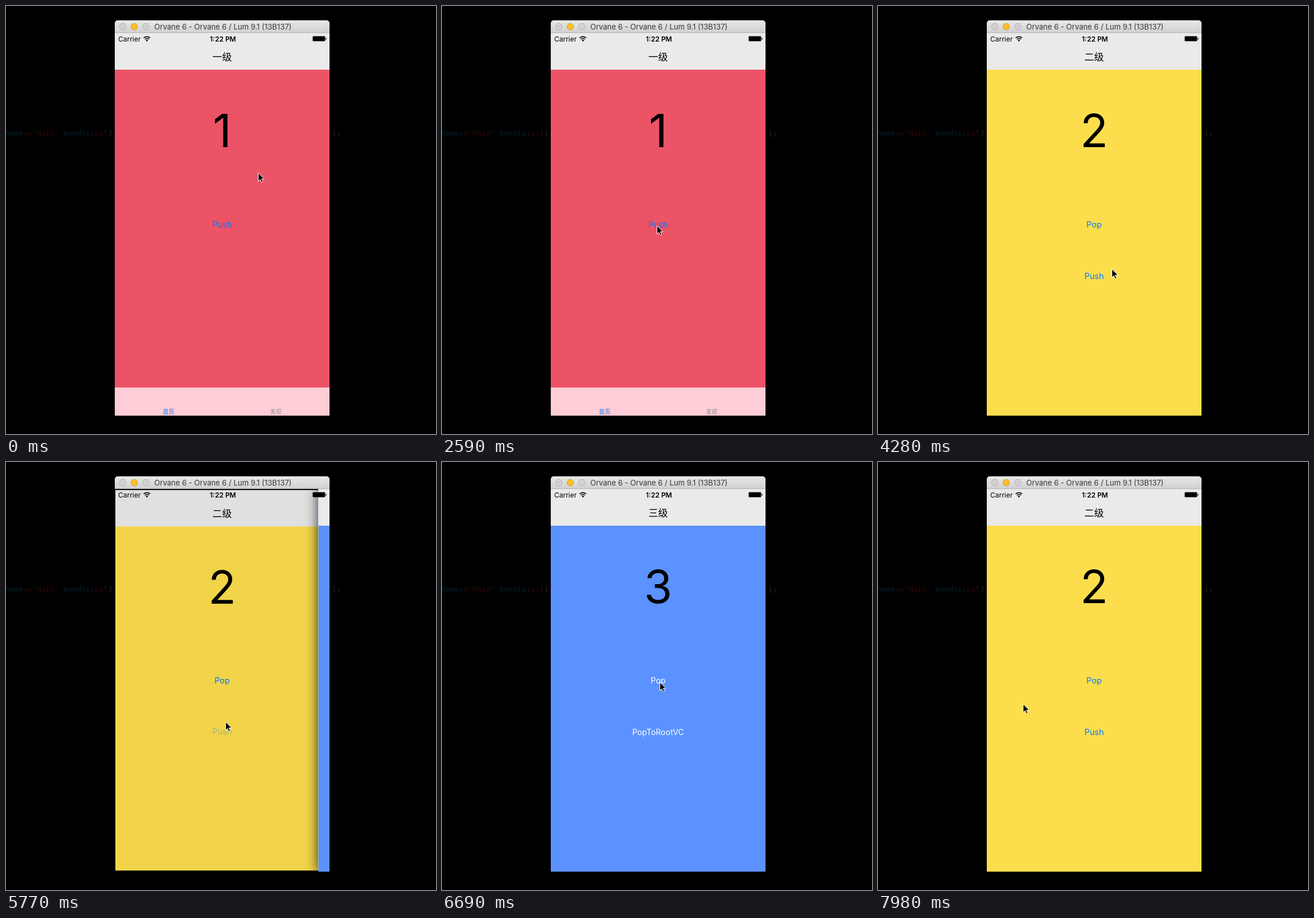
An HTML page for the animation above (8 s loop, 751 px wide and 746 px high).

```html
<!DOCTYPE html>
<html lang="zh-CN">
<head>
<meta charset="utf-8">
<title>Push and pop</title>
<style>
html, body { margin: 0; width: 100%; height: 100%; overflow: hidden; background: #000; }
svg { display: block; overflow: hidden; font-family: Inter, "Noto Sans CJK SC", "Noto Sans CJK", sans-serif; }
.stage, .chrome { position: absolute; left: 0; top: 0; }
.stage { width: 751px; height: 746px; overflow: hidden; background: #000; }
.screen { position: absolute; left: 190px; top: 47px; width: 375px; height: 667px; overflow: hidden; background: #000; }
.page, .shade, .status { position: absolute; left: 0; top: 0; width: 375px; height: 667px; }
.page { box-shadow: 0 0 20px rgba(0, 0, 0, .8); }
.shade { background: #000; opacity: 0; }

.nav { fill: #eaeaea; }
.heading, .digit, .button, .tab { text-anchor: middle; }
.heading { font-size: 17px; font-weight: 500; font-family: "Noto Sans CJK SC", "Noto Sans CJK", sans-serif; }
.digit { font-size: 80px; }
.button { font-size: 14.5px; fill: #007aff; }
.light .button { font-size: 14px; fill: #fff; }
.tab { font-size: 10px; font-family: "Noto Sans CJK SC", "Noto Sans CJK", sans-serif; }
.code { font: bold 13px "DejaVu Sans Mono", monospace; white-space: pre; }

.first, .second, .third, .shade, .pressed, .cursor { animation: 8s linear infinite; }
.first { animation-name: first; }
.second { animation-name: second; }
.third { animation-name: third; }
.first .shade { animation-name: dim-first; }
.second .shade { animation-name: dim-second; }
.pressed { animation-name: press; }
.cursor { animation-name: cursor; }

/* Pages rest at 420px so that their shadow stays off screen. */
@keyframes first {
  0%, 42.24% { transform: none; animation-timing-function: ease-in-out; }
  48.49%, 50% { transform: scale(.9); visibility: visible; }
  50.01%, 100% { transform: scale(.9); visibility: hidden; }
}
@keyframes dim-first {
  0%, 42.24% { opacity: 0; animation-timing-function: ease-in-out; }
  48.49%, 100% { opacity: .8; }
}
@keyframes second {
  0%, 42.23% { transform: translateX(420px); }
  42.24% { transform: translateX(375px); animation-timing-function: ease-in-out; }
  48.49% { transform: translateX(0); }
  48.5%, 71.13% { transform: scale(1); animation-timing-function: ease-in-out; }
  77.38%, 89.26% { transform: scale(.9); animation-timing-function: ease-in-out; }
  95.51%, 100% { transform: scale(1); }
}
@keyframes dim-second {
  0%, 71.13% { opacity: 0; animation-timing-function: ease-in-out; }
  77.38%, 89.26% { opacity: .8; animation-timing-function: ease-in-out; }
  95.51%, 100% { opacity: 0; }
}
@keyframes third {
  0%, 71.12% { transform: translateX(420px); }
  71.13% { transform: translateX(375px); animation-timing-function: ease-in-out; }
  77.38%, 89.26% { transform: translateX(0); animation-timing-function: ease-in-out; }
  95.51% { transform: translateX(375px); }
  95.52%, 100% { transform: translateX(420px); }
}
@keyframes press {
  0%, 69.12% { opacity: 1; }
  69.13%, 78% { opacity: .35; }
  78.01%, 100% { opacity: 1; }
}
@keyframes cursor {
  0%, 8.25% { transform: translate(440px, 290px); }
  11% { transform: translate(482px, 332px); }
  13.8% { transform: translate(452px, 391px); }
  17.5%, 18.9% { transform: translate(376px, 383px); }
  19%, 32.4% { transform: translate(375px, 382px); }
  34.6% { transform: translate(382px, 375px); }
  38% { transform: translate(319px, 432px); }
  41.88% { transform: translate(387px, 468px); }
  44.75%, 53% { transform: translate(436px, 458px); }
  55.63%, 58.2% { transform: translate(292px, 456px); }
  60% { transform: translate(310px, 465px); }
  63.13%, 69.1% { transform: translate(373px, 454px); }
  72.13% { transform: translate(383px, 452px); }
  75.13% { transform: translate(392px, 449px); }
  78.63% { transform: translate(397px, 441px); }
  83.63%, 88.4% { transform: translate(380px, 383px); }
  92.5% { transform: translate(397px, 411px); }
  98.25% { transform: translate(260px, 423px); }
  99.7%, 100% { transform: translate(253px, 421px); }
}
</style>
</head>
<body>
<div class="stage">
  <svg class="chrome" width="751" height="746">
    <defs>
      <linearGradient id="bar" x2="0" y2="1">
        <stop stop-color="#e9e8e9"/>
        <stop offset="1" stop-color="#d1cfd1"/>
      </linearGradient>
    </defs>
    <text class="code" x="-1.6" y="226" fill="#1b1b1b"><tspan fill="#04161e">Name</tspan>:<tspan fill="#200606">@"Main"</tspan> <tspan fill="#04161e">bundle</tspan>:<tspan fill="#1f0511">nil</tspan>]</text>
    <text class="code" x="561.5" y="226" fill="#1b1b1b"><tspan fill="#200606">"</tspan>];</text>
    <path d="M190 47V30a5 5 0 0 1 5-5h365a5 5 0 0 1 5 5v17z" fill="url(#bar)"/>
    <path d="M190 46.5h375" stroke="#b4b2b4"/>
    <g fill="#d5d3d5" stroke="#b3b1b3">
      <circle cx="204" cy="36" r="5.7"/>
      <circle cx="224" cy="36" r="5.7" fill="#fdbd2e" stroke="#dfa023"/>
      <circle cx="244" cy="36" r="5.7"/>
    </g>
    <g fill="#b9b7b9">
      <circle cx="204" cy="36" r="1"/>
      <circle cx="244" cy="36" r="1"/>
    </g>
    <text x="259" y="41" font-size="13" fill="#373737">Orvane 6 - Orvane 6 / Lum 9.1 (13B137)</text>
  </svg>

  <div class="screen">
    <div class="page first">
      <svg width="375" height="667" viewBox="190 47 375 667">
        <path d="M190 47h375v667h-375z" fill="#ec5367"/>
        <path class="nav" d="M190 47h375v64h-375z"/>
        <text class="heading" x="377.5" y="95">一级</text>
        <text class="digit" x="377.5" y="246">1</text>
        <text class="button" x="377.5" y="386">Push</text>
        <path d="M190 665h375v49h-375z" fill="#fecdd6"/>
        <text class="tab" x="284" y="710.5" fill="#007aff">首页</text>
        <text class="tab" x="471" y="710.5" fill="#8e8e8e">发现</text>
      </svg>
      <div class="shade"></div>
    </div>

    <div class="page second">
      <svg width="375" height="667" viewBox="190 47 375 667">
        <path d="M190 47h375v667h-375z" fill="#fcde4d"/>
        <path class="nav" d="M190 47h375v64h-375z"/>
        <text class="heading" x="377.5" y="95">二级</text>
        <text class="digit" x="377.5" y="246">2</text>
        <text class="button" x="377.5" y="386">Pop</text>
        <text class="button pressed" x="377.5" y="476">Push</text>
      </svg>
      <div class="shade"></div>
    </div>

    <div class="page third">
      <svg class="light" width="375" height="667" viewBox="190 47 375 667">
        <path d="M190 47h375v667h-375z" fill="#5b92ff"/>
        <path class="nav" d="M190 47h375v64h-375z"/>
        <text class="heading" x="377.5" y="95">三级</text>
        <text class="digit" x="377.5" y="246">3</text>
        <text class="button" x="377.5" y="386">Pop</text>
        <text class="button" x="377.5" y="476">PopToRootVC</text>
      </svg>
    </div>

    <svg class="status" width="375" height="667" viewBox="190 47 375 667">
      <text x="196" y="61.5" font-size="12">Carrier</text>
      <text x="356" y="61.5" font-size="12" font-weight="600">1:22 PM</text>
      <g fill="none" stroke="#000" stroke-width="1.7">
        <path d="M240.4 55.7a8.1 8.1 0 0 1 11.4 0"/>
        <path d="M242.6 58a5 5 0 0 1 7 0"/>
      </g>
      <path d="M246.1 62l-2-2.2a2.9 2.9 0 0 1 4 0z"/>
      <rect x="535.5" y="52.5" width="22" height="9" rx="1.5" fill="none" stroke="#555" stroke-width=".6"/>
      <rect x="536" y="53" width="21" height="8" rx="1"/>
      <path d="M558.3 55.5a1.6 1.6 0 0 1 0 3.2z"/>
    </svg>
  </div>

  <svg class="chrome" width="751" height="746">
    <path class="cursor" d="M.5 1v14.6l3.4-3.2 2.3 5.2 2.5-1.1-2.3-5h4.7z" stroke="#fff" stroke-linejoin="round"/>
  </svg>
</div>
</body>
</html>
```
